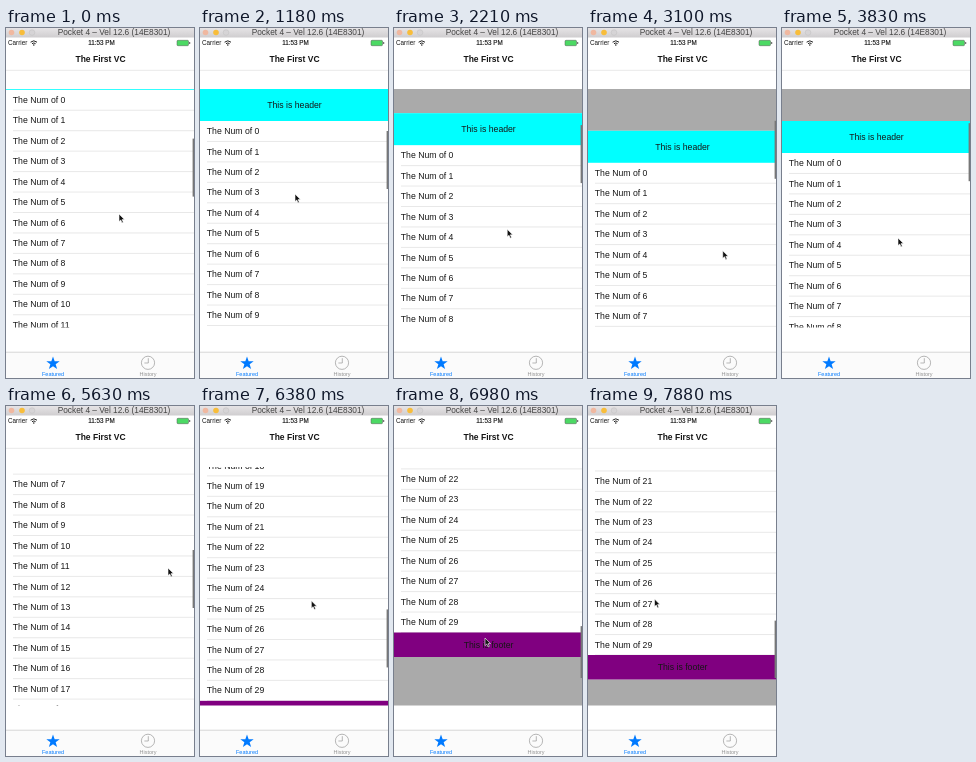
These frames come from a looping animation (188 px wide and 350 px high, 8 s). An HTML page:

```html
<!DOCTYPE html>
<html lang="en">
<head>
<meta charset="utf-8">
<title>Table with header and footer</title>
<style>
  html, body { margin: 0; width: 100%; height: 100%; overflow: hidden; background: #fff; }
  svg { display: block; width: 188px; height: 350px; }
  text { font-family: "Liberation Sans", Arial, sans-serif; font-size: 8.7px; fill: #161616; }
  .mid { text-anchor: middle; }
  .win { font-size: 8.3px; fill: #444; }
  .status { font-size: 6.3px; }
  .nav { font-size: 8.5px; font-weight: bold; }
  .tab { font-size: 5.5px; }
  .rule { stroke: #d9d9d9; stroke-width: .6; }
</style>
</head>
<body>
<svg viewBox="0 0 188 350">
  <defs>
    <linearGradient id="chrome" x2="0" y2="1">
      <stop offset="0" stop-color="#e6e4e6"/>
      <stop offset="1" stop-color="#cfcdcf"/>
    </linearGradient>
    <clipPath id="view"><rect y="61" width="188" height="238.5"/></clipPath>
  </defs>
  <rect width="188" height="350" fill="#fff"/>

  <g id="window">
    <rect width="188" height="9.5" fill="url(#chrome)"/>
    <circle cx="5.5" cy="4.5" r="2.8" fill="#f0b8a0"/>
    <circle cx="16" cy="4.5" r="2.8" fill="#f8bd3a"/>
    <circle cx="26" cy="4.5" r="2.8" fill="#d6d4d6" stroke="#bbb" stroke-width=".4"/>
    <text class="win mid" x="108" y="7">Pocket 4 – Vel 12.6 (14E8301)</text>
  </g>

  <g id="status">
    <text class="status" x="2" y="17.2">Carrier</text>
    <g fill="none" stroke="#222" stroke-width="1">
      <path d="M24.6 14.2Q27.8 11.4 31 14.2M26 15.7Q27.8 14.2 29.6 15.7"/>
    </g>
    <circle cx="27.8" cy="17" r=".8" fill="#222"/>
    <text class="status mid" x="95.5" y="17.2" stroke="#161616" stroke-width=".15">11:53 PM</text>
    <rect x="171" y="12.3" width="11.5" height="5.4" rx="1" fill="#4cd964" stroke="#555" stroke-width=".5"/>
    <rect x="183.2" y="14" width="1" height="2" fill="#555"/>
  </g>

  <text class="nav mid" x="94.5" y="34.2">The First VC</text>
  <path d="M0 42.3H188" class="rule" stroke="#c4c4c4"/>

  <g clip-path="url(#view)">
    <rect id="above" y="61" width="188" height="0" fill="#aaa"/>
    <rect id="below" width="188" height="240" fill="#aaa"/>
    <g id="table"></g>
  </g>
  <rect id="thumb" x="186.6" width="1.4" fill="#777"/>

  <g id="tabs">
    <rect y="324" width="188" height="26" fill="#fbfbfb"/>
    <path d="M0 324.2H188" stroke="#bcbcbc" stroke-width=".6"/>
    <polygon id="star" fill="#007aff"/>
    <text class="tab mid" x="47" y="348" style="fill:#007aff">Featured</text>
    <g fill="none" stroke="#999" stroke-width=".7">
      <circle cx="142" cy="334.8" r="6.6"/>
      <path d="M142.3 330.2V335H138.4"/>
    </g>
    <text class="tab mid" x="142" y="348" style="fill:#929292">History</text>
  </g>

  <path id="cursor" d="M0 0V7.6L1.8 6L3 8.9L4.3 8.3L3.1 5.6H5.5Z" fill="#111" stroke="#fff" stroke-width=".6"/>
</svg>
<script>
const $ = id => document.getElementById(id);
const LOOP = 8000, TOP = 61, HEAD = 32, ROW = 20.45, ROWS = 30, FOOT = 24.5;
const FOOT_Y = HEAD + ROWS * ROW;

// Table content, measured from the top of the header
function band(y, h, fill, label) {
  return `<rect y="${y}" width="188" height="${h}" fill="${fill}"/>` +
    `<text class="mid" x="94.5" y="${y + h / 2 + 3}">${label}</text>`;
}
let rows = `<rect y="${HEAD}" width="188" height="${ROWS * ROW}" fill="#fff"/>`;
for (let i = 0; i < ROWS; i++) {
  const y = HEAD + i * ROW;
  rows += `<text x="6.8" y="${y + 13.1}">The Num of ${i}</text>` +
    `<path class="rule" d="M7 ${y + ROW}H188"/>`;
}
$("table").innerHTML = rows + band(0, HEAD, "#0ff", "This is header") +
  band(FOOT_Y, FOOT, "#800080", "This is footer");

$("star").setAttribute("points", Array.from({ length: 10 }, (_, i) => {
  const r = i % 2 ? 2.8 : 7, a = i * Math.PI / 5;
  return [47 + r * Math.sin(a), 335.4 - r * Math.cos(a)].map(v => v.toFixed(2));
}).join(" "));

// Screen updates: first time, last time, count
const bursts = [
  [150, 1180, 8], [1470, 2510, 8], [2800, 3830, 8], [3980, 4280, 3],
  [4580, 5330, 6], [5630, 6530, 7], [6830, 7730, 7], [7880, 7880, 1]
];
const ticks = [0];
for (const [a, b, n] of bursts)
  for (let i = 0; i < n; i++) ticks.push(n > 1 ? Math.round((a + (b - a) * i / (n - 1)) / 10) * 10 : a);

// Time, scroll offset, pointer x, pointer y
const keys = [
  [0, 31.2, 113, 186], [600, 8, 110, 204], [880, 0, 104, 186], [1180, 0, 95, 166],
  [1470, -2, 95, 168], [2200, -24, 113, 201], [2510, -29, 120, 209],
  [3100, -42, 135, 223], [3400, -47, 132, 227], [3830, -32, 116, 210],
  [3980, -18, 108, 197], [4280, 6, 95, 174], [4580, 14, 98, 168],
  [4900, 70, 123, 138], [5330, 150, 156, 168], [5630, 168, 162, 162],
  [6080, 320, 138, 148], [6530, 457.5, 98, 218], [6830, 472, 92, 228],
  [6980, 480, 91, 232], [7280, 486, 84, 221], [7730, 457.5, 68, 197],
  [7880, 457.5, 66.5, 193]
];

function pose(t) {
  const i = keys.findIndex(k => k[0] > t);
  if (i < 0) return keys[keys.length - 1].slice(1);
  const a = keys[i - 1], b = keys[i], p = (t - a[0]) / (b[0] - a[0]);
  return a.slice(1).map((v, j) => v + (b[j + 1] - v) * p);
}

function draw(time) {
  const t = time % LOOP;
  const [scroll, x, y] = pose(ticks.filter(k => k <= t).pop());
  const top = TOP - scroll;
  $("table").setAttribute("transform", `translate(0 ${top})`);
  $("above").setAttribute("height", Math.max(0, -scroll));
  $("below").setAttribute("y", top + FOOT_Y + FOOT);
  const bar = 103 + .244 * scroll;
  $("thumb").setAttribute("y", bar);
  $("thumb").setAttribute("height", Math.min(58, 272 - bar));
  $("cursor").setAttribute("transform", `translate(${x} ${y})`);
}

const start = performance.now();
function loop() {
  draw(performance.now() - start);
  requestAnimationFrame(loop);
}
loop();
</script>
</body>
</html>
```
